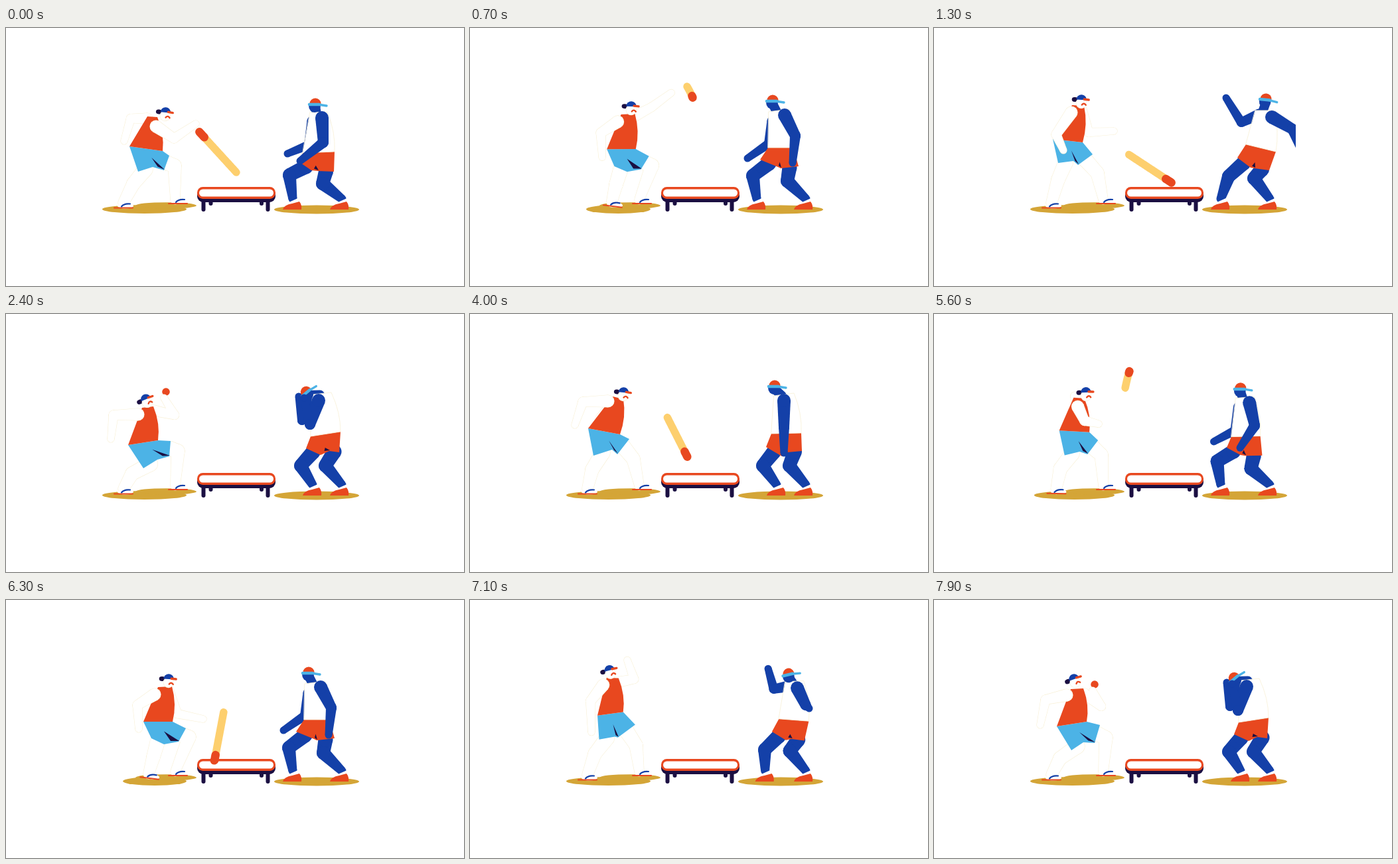
An HTML page with a canvas that plays this animation: 690 px wide and 388 px high, repeating every 8000 ms.

```html
<!DOCTYPE html>
<html lang="en">
<head>
<meta charset="utf-8">
<title>Roundnet rally</title>
<style>
  html, body { margin: 0; width: 100%; height: 100%; overflow: hidden; background: #fff; }
  canvas { display: block; width: 690px; height: 388px; }
</style>
</head>
<body>
<canvas id="stage"></canvas>
<script>
const W = 690, H = 388, LOOP = 8000, CYCLE = 5400, TRAIL = 95;
const RED = '#e8481f', BLUE = '#1440a8', SKY = '#4cb3e6', NAVY = '#1b0f42',
      SAND = '#d4a537', GLOW = '#fdc95a', CREAM = '#f8f0d6', WHITE = '#fff';
const canvas = document.getElementById('stage'), g = canvas.getContext('2d');
const dpr = window.devicePixelRatio || 1;
canvas.width = W * dpr;
canvas.height = H * dpr;

// Poses. shirt: corners clockwise from top left; hem: four points of the shorts;
// head: x, y, tilt; near/far: shoulder, elbow, hand; knee: rear/left, front/right.
const lefty = {
  reach: {
    shirt: [213, 133, 228, 134, 236, 185, 186, 178], hem: [246, 192, 238, 214, 221, 209, 199, 216],
    head: [240, 130, .1], near: [226, 148, 253, 166, 286, 144], far: [213, 136, 188, 136, 178, 170],
    knee: [192, 234, 254, 207], foot: [0]
  },
  step: {
    shirt: [229, 131, 250, 130, 251, 183, 207, 183], hem: [271, 193, 260, 213, 238, 217, 219, 208],
    head: [245, 122, .05], near: [224, 142, 198, 158, 200, 194], far: [245, 138, 258, 171, 297, 179],
    knee: [222, 236, 276, 206], foot: [1]
  },
  push: {
    shirt: [208, 116, 226, 117, 224, 172, 179, 167], hem: [239, 190, 217, 206, 210, 200, 187, 203],
    head: [222, 111, .05], near: [207, 127, 184, 160, 195, 184], far: [222, 123, 233, 157, 271, 155],
    knee: [187, 228, 246, 218], foot: [0]
  },
  low: {
    shirt: [205, 141, 222, 139, 229, 190, 184, 197], hem: [248, 191, 246, 214, 228, 219, 207, 232],
    head: [212, 131, -.4], near: [199, 151, 162, 152, 158, 188], far: [222, 145, 254, 152, 238, 126],
    knee: [190, 240, 259, 206], foot: [0]
  },
  high: {
    shirt: [206, 134, 225, 133, 230, 183, 185, 190], hem: [250, 188, 242, 215, 225, 214, 207, 226],
    head: [212, 122, -.35], near: [200, 143, 168, 150, 160, 188], far: [225, 140, 252, 160, 239, 136],
    knee: [190, 238, 259, 207], foot: [0]
  },
  lean: {
    shirt: [215, 124, 231, 128, 226, 181, 178, 172], hem: [240, 188, 222, 211, 214, 204, 186, 213],
    head: [231, 121, .1], near: [208, 131, 170, 132, 158, 167], far: [218, 134, 205, 145, 195, 155],
    knee: [184, 234, 246, 218], foot: [0]
  },
  tall: {
    shirt: [206, 114, 224, 115, 231, 166, 193, 171], hem: [249, 187, 220, 206, 217, 204, 193, 207],
    head: [211, 106, -.25], near: [201, 125, 184, 152, 186, 200], far: [222, 121, 237, 148, 267, 146],
    knee: [188, 230, 249, 220], foot: [0]
  }
};

const righty = {
  reach: {
    shirt: [458, 127, 484, 126, 495, 186, 447, 188], hem: [494, 216, 470, 215, 460, 214, 444, 203],
    head: [466, 115, 0], near: [476, 135, 478, 172, 443, 200], far: [462, 140, 456, 176, 424, 189],
    knee: [427, 221, 477, 234], foot: [0]
  },
  wait: {
    shirt: [450, 126, 480, 122, 487, 180, 449, 180], hem: [495, 208, 468, 211, 464, 209, 437, 198],
    head: [456, 110, 0], near: [474, 131, 490, 162, 486, 203], far: [456, 140, 450, 174, 418, 196],
    knee: [426, 222, 478, 230], foot: [0]
  },
  miss: {
    shirt: [484, 124, 512, 124, 515, 186, 470, 175], hem: [505, 214, 483, 211, 477, 210, 457, 195],
    head: [500, 108, .1], near: [509, 134, 540, 152, 556, 190], far: [490, 130, 463, 142, 440, 105],
    knee: [444, 223, 482, 226], foot: [0]
  },
  despair: {
    shirt: [462, 121, 490, 118, 504, 177, 459, 184], hem: [502, 208, 487, 206, 474, 212, 452, 202],
    head: [453, 118, -.7], near: [471, 130, 458, 166, 449, 126], far: [462, 130, 446, 160, 441, 124],
    knee: [444, 228, 481, 228], foot: [1]
  },
  stand: {
    shirt: [458, 123, 488, 119, 499, 179, 454, 180], hem: [500, 206, 478, 208, 470, 214, 446, 200],
    head: [459, 109, 0], near: [473, 130, 473, 170, 473, 209], far: [473, 132, 472, 170, 472, 207],
    knee: [441, 228, 481, 228], foot: [1]
  },
  swing: {
    shirt: [472, 122, 498, 122, 505, 181, 452, 180], hem: [497, 213, 474, 211, 463, 212, 446, 200],
    head: [469, 110, 0], near: [480, 130, 454, 153, 413, 131], far: [498, 132, 519, 158, 526, 200],
    knee: [434, 221, 480, 232], foot: [0]
  }
};

const key = (t, pose, change) => ({ t, pose: { ...pose, ...change } });
const hold = { far: [225, 132, 240, 155, 258, 140] };

const leftKeys = [
  key(0, lefty.reach),
  key(480, lefty.tall, { far: [222, 121, 252, 104, 275, 88], foot: [.5] }),
  key(740, lefty.step, { far: [245, 136, 275, 120, 305, 98] }),
  key(900, lefty.step),
  key(1120, lefty.push, { far: [222, 123, 240, 138, 262, 172] }),
  key(1300, lefty.push),
  key(1650, lefty.tall, { far: [222, 121, 248, 114, 240, 82] }),
  key(1900, lefty.low, { far: [222, 145, 240, 160, 212, 160] }),
  key(2180, lefty.high, { far: [225, 136, 252, 110, 240, 78] }),
  key(2400, lefty.low),
  key(2500, lefty.high),
  key(2700, lefty.low),
  key(3050, lefty.lean, hold),
  key(3550, lefty.lean, hold),
  key(3720, lefty.tall, { far: [222, 121, 250, 118, 270, 94] }),
  key(3870, lefty.lean, { far: [228, 132, 258, 122, 283, 130] }),
  key(4000, lefty.lean),
  key(4350, lefty.lean, hold),
  key(4610, lefty.tall, { far: [222, 121, 250, 145, 284, 162] }),
  key(4900, lefty.tall),
  key(CYCLE, lefty.reach)
];

const rightKeys = [
  key(0, righty.reach),
  key(450, righty.wait),
  key(900, righty.wait),
  key(1300, righty.miss),
  key(1500, righty.miss, { far: [490, 130, 466, 115, 455, 88] }),
  key(1950, righty.despair),
  key(2900, righty.despair),
  key(3400, righty.stand),
  key(4000, righty.stand),
  key(4160, righty.swing, { near: [480, 130, 450, 162, 412, 162], foot: [.4] }),
  key(4330, righty.swing, { near: [480, 130, 462, 118, 436, 94] }),
  key(4440, righty.reach),
  key(4900, righty.swing),
  key(5080, righty.swing, { near: [480, 130, 462, 118, 438, 98] }),
  key(5200, righty.reach, { near: [476, 135, 466, 160, 424, 180] }),
  key(CYCLE, righty.reach)
];

// Ball path: time, x, y, bend (1 slows into an apex, 2 falls from it).
const flights = [
  [[0, 292, 157], [15, 282, 146], [360, 305, 70, 1], [740, 339, 113, 2], [805, 328, 168], [900, 314, 242],
   [1030, 274, 152], [1100, 268, 122, 1], [1175, 275, 172, 2], [1205, 293, 190], [1300, 357, 232],
   [1312, 365, 239], [1420, 434, 158], [1570, 565, 84]],
  [[3550, 261, 131], [3730, 280, 82, 1], [3870, 284, 130, 2], [3905, 297, 155], [4000, 327, 214],
   [4040, 341, 240], [4160, 408, 160], [4290, 424, 82, 1], [4400, 416, 172, 2], [4480, 370, 240],
   [4610, 288, 160], [4680, 280, 118, 1], [4760, 282, 167, 2], [4805, 306, 203], [4853, 335, 245],
   [4900, 365, 203], [4970, 408, 141], [5070, 424, 90, 1], [5190, 416, 184, 2], [5270, 368, 240],
   [CYCLE, 292, 157]]
];

const mix = (a, b, u) => a + (b - a) * u;

function poseAt(keys, t) {
  const i = Math.max(1, keys.findIndex(k => k.t >= t));
  const a = keys[i - 1], b = keys[i];
  let u = (t - a.t) / (b.t - a.t);
  u = u * u * (3 - 2 * u);
  const out = {};
  for (const part in a.pose) out[part] = a.pose[part].map((v, n) => mix(v, b.pose[part][n], u));
  return out;
}

function ballAt(t) {
  t = (t + CYCLE) % CYCLE;
  const path = flights.find(f => t >= f[0][0] && t <= f[f.length - 1][0]);
  if (!path) return null;
  const i = Math.max(1, path.findIndex(p => p[0] >= t));
  const a = path[i - 1], b = path[i], u = (t - a[0]) / (b[0] - a[0]);
  const v = b[3] === 1 ? 1 - (1 - u) ** 2 : b[3] === 2 ? u * u : u;
  return [mix(a[1], b[1], u), mix(a[2], b[2], v)];
}

const pairs = list => list.reduce((out, v, i) => (i % 2 ? out[out.length - 1].push(v) : out.push([v]), out), []);
const middle = (a, b, u = .5) => [mix(a[0], b[0], u), mix(a[1], b[1], u)];

function fill(color) { g.fillStyle = color; g.fill(); }

function polygon(points, color) {
  g.beginPath();
  points.forEach(p => g.lineTo(...p));
  g.closePath();
  fill(color);
}

function oval(x, y, rx, ry, color) {
  g.beginPath();
  g.ellipse(x, y, rx, ry, 0, 0, 7);
  fill(color);
}

function line(points, width, color, cap = 'round') {
  g.beginPath();
  points.forEach(p => g.lineTo(...p));
  g.lineWidth = width;
  g.lineCap = cap;
  g.lineJoin = 'round';
  g.strokeStyle = color;
  g.stroke();
}

function curve(a, c, b, width, color) {
  g.beginPath();
  g.moveTo(...a);
  g.quadraticCurveTo(...c, ...b);
  g.lineWidth = width;
  g.lineCap = 'round';
  g.strokeStyle = color;
  g.stroke();
}

function pill(x, y, w, h, r, color) {
  g.beginPath();
  g.roundRect(x, y, w, h, r);
  fill(color);
}

function taper(a, b, ra, rb, color) {
  const n = Math.atan2(b[1] - a[1], b[0] - a[0]) + Math.PI / 2, c = Math.cos(n), s = Math.sin(n);
  polygon([[a[0] + c * ra, a[1] + s * ra], [b[0] + c * rb, b[1] + s * rb],
           [b[0] - c * rb, b[1] - s * rb], [a[0] - c * ra, a[1] - s * ra]], color);
  oval(...a, ra, ra, color);
  oval(...b, rb, rb, color);
}

function limb([a, b, c], [ra, rb, rc], color) {
  const draw = (grow, tint) => {
    taper(a, b, ra + grow, rb + grow, tint);
    taper(b, c, rb + grow, rc + grow, tint);
  };
  if (color === WHITE) draw(.6, CREAM);
  draw(0, color);
}

function shirt(corners, color) {
  const [tl, tr, br, bl] = corners, m = middle(tr, br);
  g.beginPath();
  g.moveTo(...tl);
  g.lineTo(...tr);
  g.quadraticCurveTo(m[0] + 7, m[1], ...br);
  g.lineTo(...bl);
  g.closePath();
  fill(color);
  if (color === WHITE) {
    g.lineWidth = .8;
    g.strokeStyle = CREAM;
    g.stroke();
  }
}

function shorts(corners, hem, color, slit) {
  const [, , br, bl] = corners, crotch = middle(hem[1], hem[2]);
  polygon([bl, br, ...hem], color);
  const top = middle(middle(bl, br), crotch, slit);
  polygon([top, [hem[1][0] + 1, hem[1][1] - 1], [crotch[0] - 1, crotch[1] - 3]], NAVY);
}

function at([x, y, tilt], draw) {
  g.save();
  g.translate(x, y);
  g.rotate(tilt);
  draw();
  g.restore();
}

function dome(y, r, color) {
  g.beginPath();
  g.arc(0, y, r, Math.PI, 0);
  g.closePath();
  fill(color);
}

function sandal(x, y, tilt) {
  at([x, y, tilt], () => {
    oval(3, -3, 12, 4, WHITE);
    line([[-14, 0], [14, 0]], 2, RED);
    curve([-3, -2], [1, -7], [10, -6], 2.2, BLUE);
  });
}

function shoe(x) {
  g.beginPath();
  g.moveTo(x, 273);
  g.quadraticCurveTo(x + 2, 266, x + 14, 264);
  g.lineTo(x + 25, 261);
  g.quadraticCurveTo(x + 29, 266, x + 28, 273);
  g.closePath();
  fill(RED);
}

function drawLeft(p) {
  const body = pairs(p.shirt), hem = pairs(p.hem), knee = pairs(p.knee), s = p.foot[0];
  const rear = [177 + s * 38, 263 - s * 2];
  limb(pairs(p.far), [8, 6.5, 5], WHITE);
  limb([middle(hem[2], hem[3]), knee[0], rear], [11, 10, 8], WHITE);
  limb([middle(hem[0], hem[1]), knee[1], [255, 258]], [11, 10, 7], WHITE);
  sandal(177 + s * 39, 270.5 - s * 2.5, s * .13);
  sandal(259, 264, 0);
  shorts(body, hem, SKY, .45);
  shirt(body, RED);
  limb(pairs(p.near), [9, 7, 5], WHITE);
  at(p.head, () => {
    oval(-10, -3, 4.5, 3.5, NAVY);
    oval(0, 2, 8.2, 8.2, CREAM);
    oval(0, 2, 7.6, 7.6, WHITE);
    dome(-3, 7.8, BLUE);
    line([[4, -4], [11, -3.5]], 3.4, RED);
    curve([1, 4.5], [4, .5], [7, 4.5], 2.4, RED);
  });
}

function drawRight(p) {
  const body = pairs(p.shirt), hem = pairs(p.hem), knee = pairs(p.knee), dx = p.foot[0] * 30;
  const arm = [10, 8, 5.5];
  limb(pairs(p.far), [8.5, 7, 5.5], BLUE);
  const ankles = [[432 + dx, 257], [506, 257]], toes = [417 + dx, 488];
  [[2, 3], [1, 0]].forEach(([a, b], i) => {
    limb([middle(hem[a], hem[b]), knee[i], ankles[i]], [11, 10, 6.5], BLUE);
    line([[ankles[i][0] + 1, 259], [ankles[i][0] + 5, 268]], 16, WHITE, 'butt');
    shoe(toes[i]);
  });
  shorts(body, hem, RED, .72);
  const neck = middle(body[0], body[1]);
  line([[p.head[0], p.head[1] + 4], [neck[0] - 3, neck[1] + 2]], 14, BLUE);
  shirt(body, WHITE);
  at(p.head, () => {
    oval(-1, 3, 8.8, 9, BLUE);
    dome(-1, 8.6, RED);
    line([[-9, 0], [6, 0]], 4.5, SKY);
    line([[4, 0], [17, 2]], 3.4, SKY);
  });
  limb(pairs(p.near), arm, BLUE);
}

function drawNet() {
  for (const x of [305.5, 382]) pill(x, 258, 6, 9, 3, NAVY);
  for (const x of [294.5, 391.5]) pill(x, 256, 6, 20, 3, NAVY);
  pill(288, 243, 118, 19, 9, NAVY);
  pill(288, 239, 118, 18, 8.5, RED);
  pill(291, 242.5, 112, 11, 5.5, WHITE);
}

function pathOf(t, span) {
  const points = [];
  for (let d = span; d >= 0; d -= 2.5) {
    const p = ballAt(t - d);
    if (p) points.push(p);
  }
  return points;
}

function drawBall(t) {
  const trail = pathOf(t, TRAIL);
  if (!trail.length) return;
  g.globalAlpha = .88;
  line(trail, 11.5, GLOW);
  g.globalAlpha = 1;
  const tip = pathOf(t, 12.5);
  if (tip.length > 1) line(tip, 12.5, RED);
}

function render(now) {
  const t = (now % LOOP) % CYCLE;
  const left = poseAt(leftKeys, t), right = poseAt(rightKeys, t);
  g.setTransform(dpr, 0, 0, dpr, 0, 0);
  g.fillStyle = WHITE;
  g.fillRect(0, 0, W, H);
  g.save();
  g.beginPath();
  g.rect(0, 0, 545, H);
  g.clip();
  const edge = 145 + left.foot[0] * 31;
  oval((edge + 272) / 2, 272.5, (272 - edge) / 2, 6.5, SAND);
  oval(241, 267, 46, 4.8, SAND);
  oval(468, 273, 64, 6.5, SAND);
  drawNet();
  if (t >= 1900 && t < 3550) oval(left.far[4] + 3, left.far[5] - 9, 5.8, 5.8, RED);
  drawLeft(left);
  drawRight(right);
  drawBall(t);
  g.restore();
}

const start = performance.now();
function tick() {
  render(performance.now() - start);
  requestAnimationFrame(tick);
}
tick();
</script>
</body>
</html>
```
